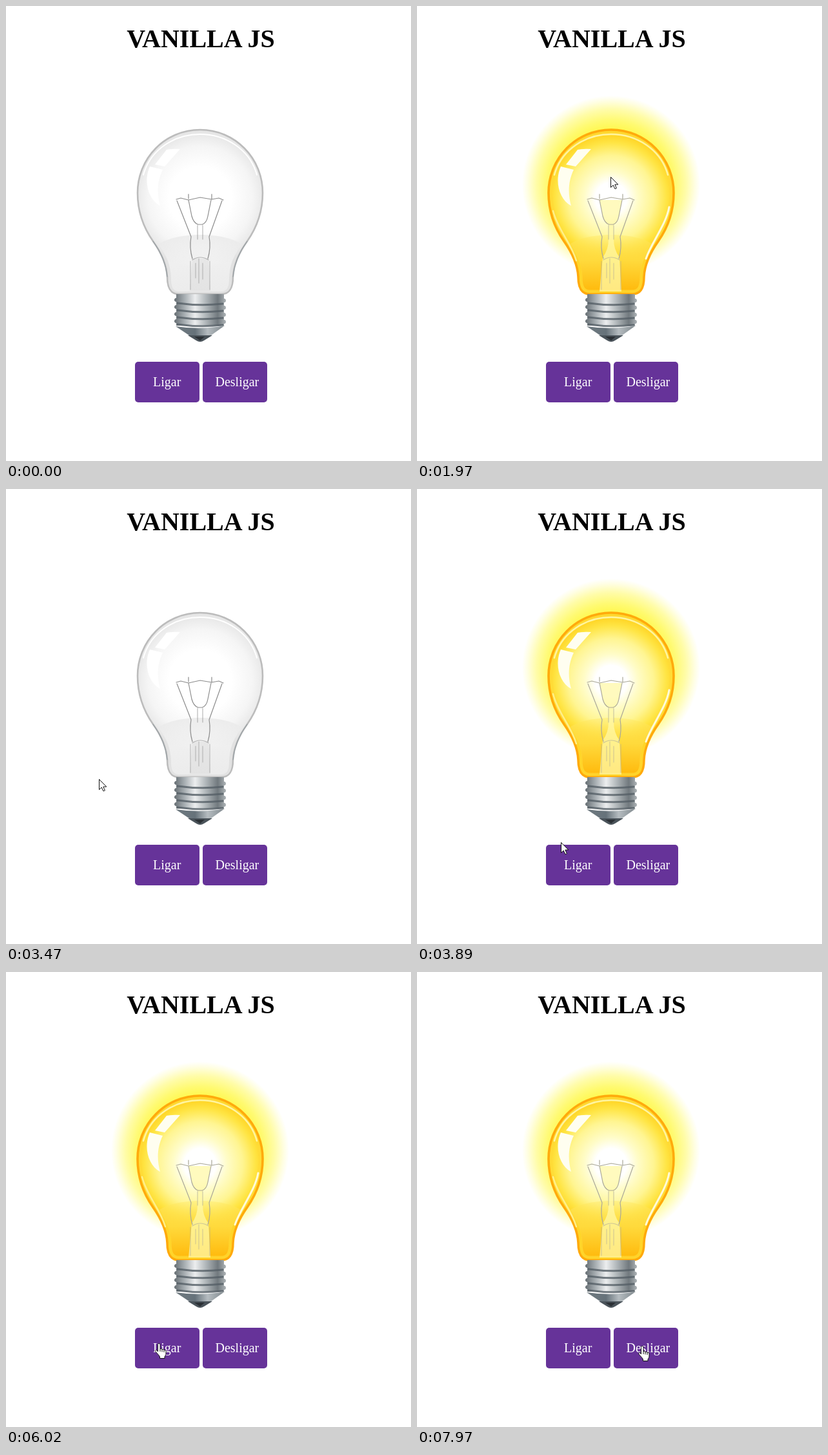
These frames come from a looping animation (628 by 706 pixels, 8 s). An HTML page:

```html
<!DOCTYPE html>
<html lang="pt">
<head>
<meta charset="utf-8">
<title>Vanilla JS</title>
<style>
html, body { margin: 0; width: 100%; height: 100%; overflow: hidden; background: #fff; }
svg { display: block; width: 628px; height: 706px; font-family: "Liberation Serif", "Times New Roman", serif; }
.title { font-size: 40px; font-weight: bold; text-anchor: middle; }
.button rect { fill: #639; }
.button text { fill: #fff; font-size: 20px; }
.wire { fill: none; stroke-linecap: round; stroke-linejoin: round; }
.cursor { fill: #fff; stroke: #111; stroke-width: 1; stroke-linejoin: round; }
</style>
</head>
<body>
<svg viewBox="0 0 628 706">
  <defs>
    <radialGradient id="halo" gradientUnits="userSpaceOnUse" cx="301" cy="277" r="138">
      <stop offset=".62" stop-color="#fff850"/>
      <stop offset=".72" stop-color="#fffa72"/>
      <stop offset=".84" stop-color="#fffca8"/>
      <stop offset=".94" stop-color="#fffee2"/>
      <stop offset="1" stop-color="#fff"/>
    </radialGradient>
    <radialGradient id="clear" gradientUnits="userSpaceOnUse" cx="301" cy="298" r="108">
      <stop offset=".45" stop-color="#fff"/>
      <stop offset=".75" stop-color="#f5f5f5"/>
      <stop offset="1" stop-color="#e2e2e2"/>
    </radialGradient>
    <radialGradient id="lit" gradientUnits="userSpaceOnUse" cx="301" cy="298" r="110">
      <stop offset=".22" stop-color="#fff"/>
      <stop offset=".38" stop-color="#fffcc8"/>
      <stop offset=".6" stop-color="#fff592"/>
      <stop offset=".78" stop-color="#ffe545"/>
      <stop offset="1" stop-color="#ffc608"/>
    </radialGradient>
    <linearGradient id="clearNeck" x2="0" y2="1">
      <stop offset="0" stop-color="#e6e6e6"/>
      <stop offset=".5" stop-color="#f5f5f5"/>
      <stop offset="1" stop-color="#f0f0f0"/>
    </linearGradient>
    <linearGradient id="litNeck" x2="0" y2="1">
      <stop offset="0" stop-color="#ffe860" stop-opacity=".4"/>
      <stop offset=".45" stop-color="#ffda3c"/>
      <stop offset="1" stop-color="#ffb90c"/>
    </linearGradient>
    <linearGradient id="metal" gradientUnits="userSpaceOnUse" x1="262" x2="340">
      <stop offset="0" stop-color="#6b7378"/>
      <stop offset=".18" stop-color="#a4abaf"/>
      <stop offset=".4" stop-color="#eceeef"/>
      <stop offset=".6" stop-color="#b4babd"/>
      <stop offset=".85" stop-color="#71797e"/>
      <stop offset="1" stop-color="#a9afb2"/>
    </linearGradient>
    <linearGradient id="cone" gradientUnits="userSpaceOnUse" x1="262" x2="340">
      <stop offset="0" stop-color="#6f7a80"/>
      <stop offset=".4" stop-color="#66727a"/>
      <stop offset=".65" stop-color="#b5bcc0"/>
      <stop offset="1" stop-color="#7d868b"/>
    </linearGradient>
    <path id="glass" d="M301 192C355 192 398 236 398 290C398 322 388 345 374 365C362 382 353 400 352 420C352 434 349 447 334 447H268C253 447 250 434 250 420C249 400 240 382 228 365C214 345 204 322 204 290C204 236 247 192 301 192Z"/>
    <clipPath id="inside"><use href="#glass"/></clipPath>
    <path id="neck" d="M236 370C265 350 337 350 366 370C352 388 347 402 346 422C346 435 344 443 332 443H270C258 443 256 435 256 422C255 402 250 388 236 370Z"/>
    <path id="shine" d="M231 246L249 223Q259 221 270 222L246 249ZM223 249L243 254C234 273 234 292 239 310C220 300 213 271 223 249Z"/>
    <path id="stem" d="M283 301H318L313 326Q311 337 305 340V362Q305 378 314 390L317 443H283L288 390Q297 378 297 362V340Q291 337 288 326Z"/>
    <g id="filament" class="wire">
      <path d="M265 302L287 358Q284 375 289 392M335 302L315 358Q318 375 313 392M264 300L271 298L283 301L301 297L319 300L330 298L337 301M283 299V292M319 299V292M283 301L288 326Q291 337 298 339L304 339Q311 337 313 326L318 301"/>
      <path d="M297 340V362M305 340V362M289 394Q301 386 314 394" opacity=".6"/>
      <path d="M286 396V440M294 399V422M299 392V430M305 399V424M316 396V440" opacity=".5"/>
    </g>
    <g id="base">
      <path d="M264 447H338V496H264Z" fill="url(#metal)"/>
      <g id="threads"></g>
      <path d="M263 497Q301 503 339 496L318 511H284Z" fill="url(#cone)"/>
      <path d="M282 511H320L307 519Q301 523 295 519Z" fill="#4a535a"/>
      <path d="M292 513H308L301 519Z" fill="#2b3035"/>
    </g>
  </defs>

  <text class="title" x="302" y="64">VANILLA JS</text>

  <g id="off">
    <use href="#glass" fill="url(#clear)"/>
    <use href="#neck" fill="url(#clearNeck)" opacity=".7"/>
    <use href="#glass" fill="none" stroke="#bcbcbc" stroke-width="2.6"/>
    <path class="wire" d="M213 262C224 222 262 199 301 199S378 222 389 262" stroke="#fff" stroke-width="2"/>
    <path class="wire" d="M228 365Q247 390 250 420M374 365Q355 390 352 420" stroke="#8d979d" stroke-width="1"/>
    <use href="#shine" fill="#fff"/>
    <path d="M289 392H314L317 442H285Z" fill="#ccc" opacity=".3"/>
    <use href="#filament" stroke="#8c8c8c" stroke-width="1.2"/>
  </g>

  <g id="on">
    <circle cx="301" cy="277" r="138" fill="url(#halo)"/>
    <use href="#glass" fill="url(#lit)"/>
    <use href="#neck" fill="url(#litNeck)"/>
    <g clip-path="url(#inside)">
      <use href="#glass" fill="none" stroke="#ffdc38" stroke-width="13" opacity=".7"/>
    </g>
    <use href="#glass" fill="none" stroke="#ffaa0c" stroke-width="3.6"/>
    <path class="wire" d="M213 262C224 222 262 199 301 199S378 222 389 262" stroke="#fff5a0" stroke-width="2.5"/>
    <path class="wire" d="M391 312C386 340 364 366 355 392" stroke="#fffbd8" stroke-width="3"/>
    <path class="wire" d="M211 318C218 346 239 368 247 395" stroke="#fff08a" stroke-width="2.5"/>
    <use href="#shine" fill="#fffef0"/>
    <use href="#stem" fill="#fff8a8" opacity=".75"/>
    <use href="#filament" stroke="#aaa899" stroke-width="1.2"/>
  </g>
  <use href="#base"/>

  <g class="button" id="ligar">
    <rect x="200" y="552" width="100" height="63" rx="5"/>
    <text x="228" y="590">Ligar</text>
  </g>
  <g class="button">
    <rect x="305" y="552" width="100" height="63" rx="5"/>
    <text x="324.5" y="590">Desligar</text>
  </g>

  <circle id="click" r="15" fill="#ff0" opacity=".47"/>
  <path id="arrow" class="cursor" d="M.5.5V16.5L4.2 13L7 18.8L9.4 17.7L6.8 12H11.8Z"/>
  <g id="hand" class="cursor">
    <path d="M0 .5C1.200.5 2 1.300 2 2.500V9C3 8.200 5 8.600 5 9.800C6 9 8 9.500 8 10.700C9.200 9.900 11 10.700 11 12.200V16C11 18 10 19 9 21V23.500H1.500V21C0 18-3.500 15-5 13C-6 11-4 10-2.500 11.500L-1.500 13V2.500C-1.500 1.300-1 .5 0 .5Z"/>
    <path d="M2 9V13M5 10V13.500M8 11V14" fill="none"/>
  </g>
</svg>
<script>
const $ = id => document.getElementById(id);
const LOOP = 8000;

// Screw threads: rounded ridges with a dark groove under each
$('threads').innerHTML = [456, 467, 478, 489].map(y =>
  `<path d="M264 ${y}Q301 ${y + 5} 338 ${y + 1}" class="wire" stroke="url(#metal)" stroke-width="6"/>
   <path d="M266 ${y + 5}Q301 ${y + 10} 336 ${y + 6}" class="wire" stroke="#566067" stroke-width="3" opacity=".8"/>`).join('');

// Pointer moves: first step, last step, step count, two control points, end point
const moves = [
  [670, 750, 2, 199, 690, 185, 684, 170, 677],
  [1060, 1430, 6, 97, 630, 97, 570, 159, 515],
  [1760, 2110, 6, 246, 276, 330, 245, 314, 257],
  [2440, 2780, 6, 295, 258, 245, 292, 214, 301],
  [2930, 3000, 2, 185, 315, 150, 340, 138, 365],
  [3330, 3960, 10, 112, 473, 216, 536, 230, 555],
  [4140, 4160, 2, 230, 557, 231, 559, 231, 561],
  [5600, 5730, 3, 233, 566, 235, 571, 237, 576],
  [7250, 7970, 11, 250, 647, 345, 675, 349, 580]
];

const bezier = (a, b, c, d, u) => {
  const v = 1 - u;
  return v * v * v * a + 3 * v * v * u * b + 3 * v * u * u * c + u * u * u * d;
};

function pointer(t) {
  let x = 214, y = 697;
  for (const [start, end, n, ax, ay, bx, by, ex, ey] of moves) {
    if (t < start) break;
    const step = Math.floor((t - start) / (end - start) * (n - 1) + 1e-6) + 1;
    const u = Math.min(1, step / n);
    x = bezier(x, ax, bx, ex, u);
    y = bezier(y, ay, by, ey, u);
  }
  return [Math.round(x), Math.round(y)];
}

const during = (t, a, b) => t >= a && t < b;
const show = (id, visible) => $(id).style.display = visible ? '' : 'none';
const place = (id, x, y) => $(id).setAttribute('transform', `translate(${x} ${y})`);

function draw(t) {
  const [x, y] = pointer(t);
  const overBulb = during(x, 157, 447) && during(y, 141, 550);
  const overButton = during(x, 200, 405) && during(y, 552, 615);
  const lit = t >= 6020 || overBulb;
  const pressed = during(t, 6110, 6310);
  show('on', lit);
  show('off', !lit);
  show('arrow', t >= 670 && !overButton);
  show('hand', overButton);
  show('click', pressed || during(t, 4760, 4960));
  for (const id of ['arrow', 'hand', 'click']) place(id, x, y);
  place('ligar', pressed ? 3 : 0, pressed ? 3 : 0);
}

const begin = performance.now();
function frame() {
  draw((performance.now() - begin) % LOOP);
  requestAnimationFrame(frame);
}
frame();
</script>
</body>
</html>
```
